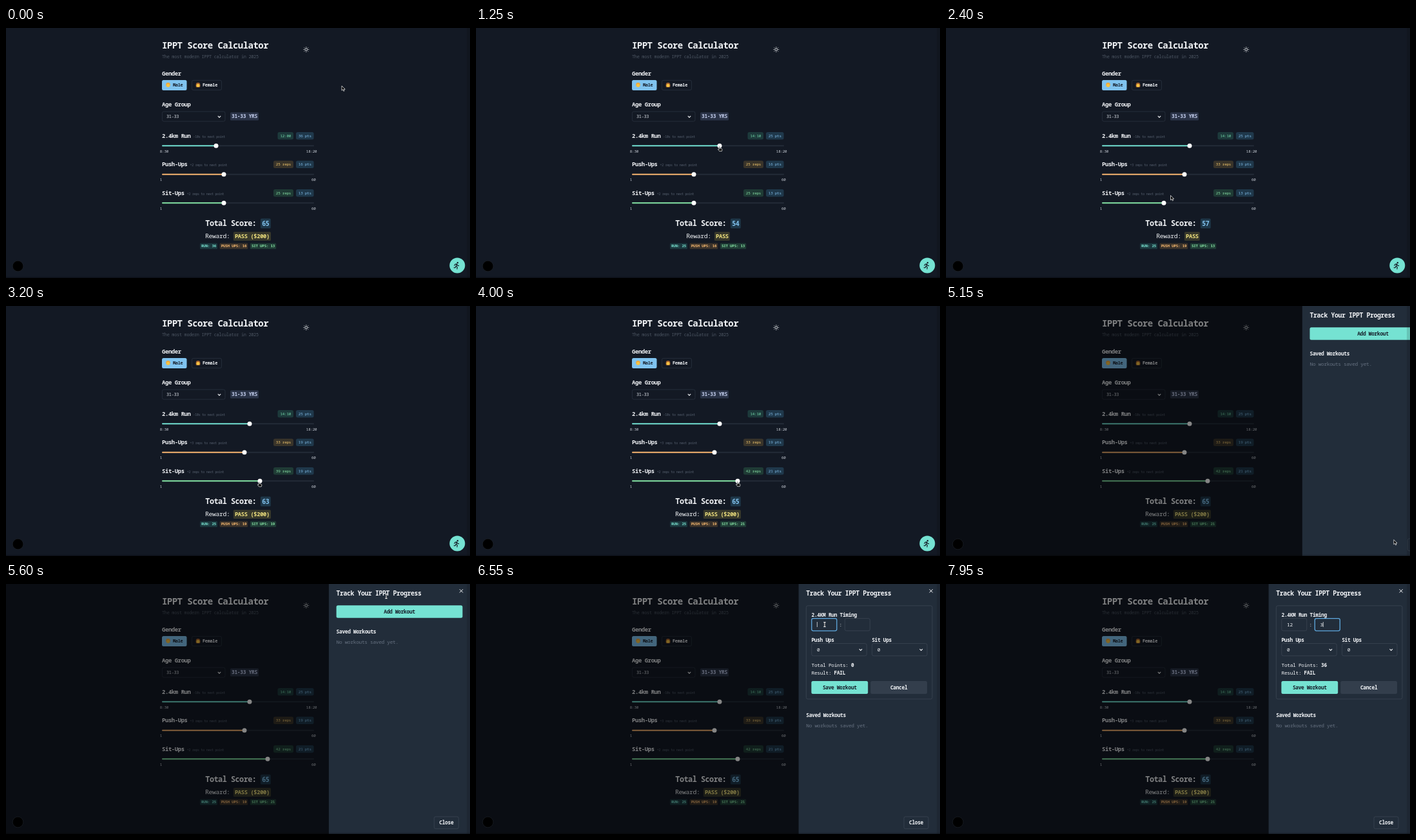
Recreate the animation shown at these times as an HTML page. Size 720 px wide and 389 px high, loop 8000 ms.

```html
<!DOCTYPE html>
<html lang="en">
<head>
<meta charset="utf-8">
<title>IPPT Score Calculator</title>
<style>
html, body { margin: 0; width: 100%; height: 100%; overflow: hidden; background: #131924; }
svg { display: block; width: 100vw; height: 100vh; }
text { font-family: "Noto Sans Mono", "DejaVu Sans Mono", monospace; letter-spacing: -.04em; white-space: pre; }
</style>
</head>
<body>
<svg id="stage" viewBox="0 0 720 389" xmlns="http://www.w3.org/2000/svg">
  <rect width="720" height="389" fill="#131924"/>
  <g id="page"></g>
  <g id="sliders"></g>
  <g id="totals"></g>
  <g id="fab"></g>
  <rect id="overlay" width="720" height="389" fill="#000" opacity="0"/>
  <g id="drawer"></g>
  <circle cx="18.5" cy="370.5" r="8.3" fill="#000" stroke="#20252d" stroke-width=".6"/>
  <rect x="715" width="5" height="389" opacity=".13"/>
  <rect y="387.5" width="720" height="1.5" opacity=".3"/>
  <g id="cursor"></g>
</svg>
<script>
const LOOP = 8000;
const $ = id => document.getElementById(id);
const WHITE = '#f2f4f7', LINE = '#2a3341', DARK = '#161d29', TEAL = '#75e2d2';

// Sizes are given as the advance of one character; the font advances .56em.
const text = (x, y, str, adv, fill = WHITE, weight = 400, anchor = 'start') =>
  `<text x="${x}" y="${y}" font-size="${(adv / .56).toFixed(2)}" fill="${fill}" font-weight="${weight}" text-anchor="${anchor}">${str}</text>`;
const box = (x, y, w, h, fill = 'none', stroke = 'none', r = 2.5, sw = .8) =>
  `<rect x="${x}" y="${y}" width="${w}" height="${h}" rx="${r}" fill="${fill}" stroke="${stroke}" stroke-width="${sw}"/>`;
const badge = (x, y, w, h, str, adv, fg, bg, weight = 400, r = 1.5) =>
  box(x, y, w, h, bg, 'none', r) + text(x + w / 2, y + h / 2 + adv * .62, str, adv, fg, weight, 'middle');
const chevron = (x, y) =>
  `<path d="M${x - 2.2} ${y - 1.2}l2.2 2.3 2.2-2.3" fill="none" stroke="${WHITE}" stroke-width="1.1"/>`;
const face = (x, y, hair, long) =>
  `<circle cx="${x}" cy="${y - .6}" r="3.3" fill="${hair}"/>` +
  (long ? box(x - 3.3, y - .6, 6.6, 4, hair, 'none', 1) : '') +
  `<circle cx="${x}" cy="${y + .7}" r="2.5" fill="#f6c544"/>`;

const clamp = u => Math.min(1, Math.max(0, u));
const smooth = u => u * u * (3 - 2 * u);
const ramp = (t, from, to) => smooth(clamp((t - from) / (to - from)));
const easeOut = u => 1 - (1 - u) ** 3;
const spring = ms => { const k = Math.max(0, ms) * .0134; return 1 - (1 + k) * Math.exp(-k); };
const latest = (t, steps) => steps.filter(s => s[0] <= t).pop()[1];

function pathAt(t, keys) {
  const i = keys.findIndex(k => k[0] > t);
  if (i < 0) return keys[keys.length - 1].slice(1);
  const [a, b] = [keys[i - 1], keys[i]], u = ramp(t, a[0], b[0]);
  return [a[1] + (b[1] - a[1]) * u, a[2] + (b[2] - a[2]) * u];
}

const OPEN = 4910, FORM = 6030;
const MOVES = [
  [0, 521, 90], [450, 521, 90], [730, 327, 184], [800, 327, 184], [1150, 378, 184],
  [1350, 378, 184], [1650, 338, 228], [1750, 338, 228], [2100, 370, 228], [2180, 370, 228],
  [2530, 339, 275], [2700, 339, 275], [3400, 406, 273], [4100, 406, 273], [4600, 698, 374],
  [5100, 698, 374], [5600, 590, 19], [5650, 590, 19], [5850, 610, 43], [6080, 610, 43], [6380, 541, 63]
];
const SHAPES = [
  [0, 'arrow'], [700, 'hand'], [1390, 'arrow'], [1600, 'hand'], [2230, 'arrow'], [2480, 'hand'],
  [4150, 'arrow'], [4550, 'hand'], [OPEN, 'arrow'], [5560, 'beam'], [5730, 'hand'],
  [FORM, 'arrow'], [6310, 'beam'], [6700, 'none']
];
const CURSORS = {
  arrow: '<path d="M0 0v7.2l1.7-1.5 1.2 2.6 1.2-.6-1.2-2.4h2.3z" fill="#000" stroke="#fff" stroke-width=".7"/>',
  hand: '<path d="M-.7 .6q.7-1 1.4 0v2.6l2.5.7q1 .4.8 1.5l-.6 2.3h-3.7l-2-2.6q-.2-1 .8-.8l.8.7z" fill="#000" stroke="#fff" stroke-width=".7"/>',
  beam: '<path d="M-1.5-3.5q1.5 0 1.5 1v5q0 1-1.5 1M1.5-3.5q-1.5 0-1.5 1M0 2.5q0 1 1.5 1" fill="none" stroke="#fff" stroke-width="1.6"/><path d="M0-3v6" stroke="#000" stroke-width=".7"/>',
  none: ''
};

function drawPage() {
  const rays = Array.from({ length: 8 }, (_, i) =>
    `<path d="M0-3.2v-1.1" transform="rotate(${i * 45})"/>`).join('');
  $('page').innerHTML =
    text(242, 32, 'IPPT Score Calculator', 7.86, WHITE, 600) +
    text(242, 46.7, 'The most modern IPPT calculator in 2025', 3.85, '#4d5663') +
    `<g transform="translate(465.8 33.5)" fill="none" stroke="${WHITE}" stroke-width=".9"><circle r="1.9"/>${rays}</g>` +
    text(242, 74, 'Gender', 4.95, WHITE, 600) +
    box(242, 81, 38.5, 16, '#80c3ef') + face(251.5, 88.8, '#f0a83a') +
    text(259, 91.4, 'Male', 3.85, DARK, 600) +
    box(288.4, 81.4, 46.2, 15.2, 'none', LINE) + face(298, 88.8, '#a5622e', true) +
    text(305, 91.4, 'Female', 3.85, WHITE, 600) +
    text(242, 122.3, 'Age Group', 4.95, WHITE, 600) +
    box(242.4, 130, 97.6, 15.2, 'none', LINE) + text(249, 140, '31-33', 3.85, '#d5dae1') + chevron(331, 138) +
    badge(348, 131.3, 44, 12.4, '31-33 YRS', 4.45, '#c3cdec', '#2a3347', 600);
  $('fab').innerHTML = `<circle cx="700.3" cy="369.5" r="12" fill="${TEAL}"/>` +
    `<circle cx="700.8" cy="365.3" r="1.2" fill="${DARK}"/>` +
    `<path d="M695.8 369.5l1.2-2 2.4-.3 1.2 2.2 2 .4M699.3 367.5l-1 3.2 2 1.3-.4 2.8M698 371l-.8 1.8h-2" fill="none" stroke="${DARK}" stroke-width="1.2" stroke-linecap="round" stroke-linejoin="round"/>`;
}

function slider(y, s) {
  const x = 242 + 236 * s.part;
  const w = s.value.length > 5 ? 31 : 24.5;
  return text(242, y - 12.3, s.name, 4.95, WHITE, 600) +
    text(242 + s.name.length * 4.95 + 4, y - 12.6, s.hint, 2.75, '#586271') +
    badge(446 - w, y - 21.3, w, 11.6, s.value, 3.33, s.fg, s.bg, 400, 2.5) +
    badge(450, y - 21.3, 27.6, 11.6, s.points + ' pts', 3.33, '#80bce8', '#1f384b', 400, 2.5) +
    box(242, y - 1, 236, 2, '#232b37', 'none', 1) + box(242, y - 1, x - 242, 2, s.color, 'none', 1) +
    `<circle cx="${x}" cy="${y}" r="3.5" fill="#fff"/>` +
    text(238.8, y + 10.3, s.min, 3.3, '#cbd0d8') +
    text(s.max.length > 2 ? 482.3 : 480.5, y + 10.3, s.max, 3.3, '#cbd0d8', 400, 'end');
}

function drawScores(t) {
  const steps = Math.round(13 * ramp(t, 800, 1150));
  const seconds = 720 + steps * 10;
  const push = 25 + Math.round(8 * ramp(t, 1750, 2100));
  const sit = 25 + Math.round(17 * ramp(t, 2700, 3400));
  const points = [36 - Math.round(steps * 11 / 13), 16 + Math.floor((push - 25) * 3 / 8), 13 + Math.floor((sit - 25) * 8 / 17)];
  const total = points[0] + points[1] + points[2];
  const clock = Math.floor(seconds / 60) + ':' + String(seconds % 60).padStart(2, '0');

  $('sliders').innerHTML =
    slider(183.2, { name: '2.4km Run', hint: '-10s to next point', value: clock, points: points[0],
      part: (seconds - 510) / 590, min: '8:30', max: '18:20', color: '#70dfcf', fg: '#76dcae', bg: '#1d3a3b' }) +
    slider(227.7, { name: 'Push-Ups', hint: `+${push < 33 ? 2 : 3} reps to next point`, value: push + ' reps', points: points[1],
      part: (push - 1) / 59, min: '1', max: '60', color: '#f5b26e', fg: '#efc56d', bg: '#39342a' }) +
    slider(272.2, { name: 'Sit-Ups', hint: '+2 reps to next point', value: sit + ' reps', points: points[2],
      part: (sit - 1) / 59, min: '1', max: '60', color: '#83e2a3', fg: '#86dda4', bg: '#1f3b35' });

  const reward = total > 60 ? 'PASS ($200)' : 'PASS';
  const rewardWidth = reward.length * 4.9 + 4.2;
  const left = 360 - (43.8 + rewardWidth) / 2;
  $('totals').innerHTML =
    text(309.3, 307.5, 'Total Score:', 6.6, WHITE, 600) +
    badge(395, 296.5, 15.7, 15.2, total, 5.6, '#80c2ee', '#1f384a', 600) +
    text(left, 326.8, 'Reward:', 5.5, WHITE, 500) +
    badge(left + 43.8, 317.3, rewardWidth, 13.6, reward, 4.9, '#f4e580', '#38392c', 600) +
    badge(301, 334.7, 27, 9.2, 'RUN: ' + points[0], 3.3, '#79e2d0', '#1b373d', 600) +
    badge(331.7, 334.7, 43.6, 9.2, 'PUSH UPS: ' + points[1], 3.3, '#f4b870', '#39312a', 600) +
    badge(378.8, 334.7, 40.4, 9.2, 'SIT UPS: ' + points[2], 3.3, '#86e3a4', '#1f3b35', 600);
}

function workoutForm(t) {
  const minutes = latest(t, [[0, ''], [6800, '1'], [6980, '12']]);
  const secs = t < 7750 ? '' : '3';
  const field = latest(t, [[0, -1], [6480, 0], [7350, 1]]);
  const border = '#3b4654', focus = '#5fa9df';
  const input = (i, x, value) =>
    box(x, 53.6, 39, 19.2, 'none', field === i ? focus : border, 2.5, field === i ? 1.3 : .8) +
    text(x + 8.3, 66, value, 4.4) +
    (field === i ? `<path d="M${x + 8.6 + value.length * 4.4} 59v8" stroke="#fff" stroke-width=".7"/>` : '');
  const select = (x, label) => text(x, 89.7, label, 4.4, WHITE, 600) +
    box(x + .4, 92.6, 85.4, 19.2, 'none', border) + text(x + 8.5, 105.2, '0', 4.4) + chevron(x + 76.5, 102.3);
  return box(512.4, 33.8, 195.6, 145.2, 'none', border) +
    text(520.5, 50.6, '2.4KM Run Timing', 4.4, WHITE, 600) +
    input(0, 520.8, minutes) + text(563.5, 66, ':', 4.4) + input(1, 572.3, secs) +
    select(520.4, 'Push Ups') + select(614.2, 'Sit Ups') +
    text(520.5, 128.8, 'Total Points:', 4.4) + text(582, 128.8, minutes === '12' ? '36' : '0', 4.4, WHITE, 700) +
    text(520.5, 140.6, 'Result:', 4.4) + text(555.5, 140.6, 'FAIL', 4.4, WHITE, 700) +
    badge(520.4, 151, 87.8, 20, 'Save Workout', 4.4, DARK, TEAL, 600, 2.5) +
    badge(612.2, 151, 87.8, 20, 'Cancel', 4.4, WHITE, '#333e4c', 600, 2.5);
}

function drawDrawer(t) {
  const shown = t >= OPEN, formOpen = t >= FORM, shift = formOpen ? 130 : 0;
  $('fab').setAttribute('visibility', shown ? 'hidden' : 'visible');
  $('overlay').setAttribute('opacity', .48 * easeOut(clamp((t - OPEN) / 200)));
  $('drawer').setAttribute('transform', `translate(${219.5 * (1 - spring(t - OPEN - 35))} 0)`);
  $('drawer').innerHTML = !shown ? '' :
    box(500.6, 0, 219.4, 389, '#222d3a', 'none', 0) +
    text(512.3, 18, 'Track Your IPPT Progress', 5.5, WHITE, 600) +
    `<path d="M703.5 8.2l5.2 5.2m0-5.2l-5.2 5.2" stroke="${WHITE}" stroke-width="1"/>` +
    (formOpen ? workoutForm(t) : badge(512.3, 33.2, 195.8, 19.6, 'Add Workout', 4.4, DARK, TEAL, 600, 2.5)) +
    text(512.3, 77.4 + shift, 'Saved Workouts', 4.4, WHITE, 600) +
    text(512.3, 93.2 + shift, 'No workouts saved yet.', 4.38, '#667180') +
    box(664, 362, 38, 18.8, 'none', '#3b4654') + text(683, 374.3, 'Close', 4.4, WHITE, 600, 'middle');
}

function drawCursor(t) {
  $('cursor').setAttribute('transform', `translate(${pathAt(t, MOVES).join(' ')})`);
  $('cursor').innerHTML = CURSORS[latest(t, SHAPES)];
}

function frame(now) {
  const t = Math.max(0, now - start) % LOOP;
  drawScores(t);
  drawDrawer(t);
  drawCursor(t);
  requestAnimationFrame(frame);
}

const start = performance.now();
drawPage();
frame(start);
</script>
</body>
</html>
```
